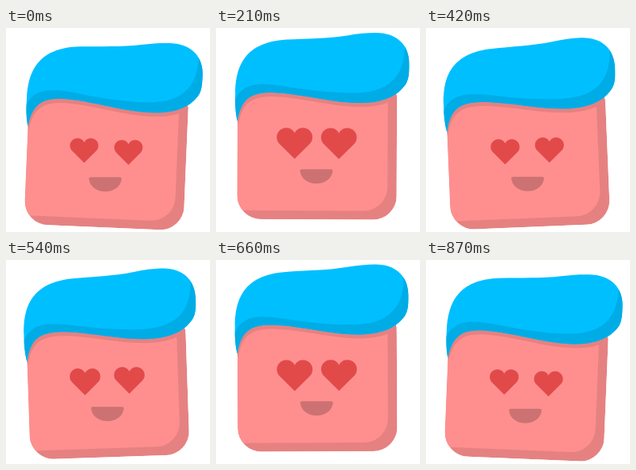
These frames come from a looping animation (256 by 256 pixels, 0.9 s). An HTML page:

```html
<!DOCTYPE html>
<html lang="en">
<head>
<meta charset="utf-8">
<title>Love-struck cube</title>
<style>
  html, body { margin: 0; width: 100%; height: 100%; overflow: hidden; background: #fff; }
  svg { display: block; width: 100%; height: 100%; }
</style>
</head>
<body>
<svg viewBox="0 0 256 256">
  <defs>
    <path id="hairShape" d="M26.800 117C24.500 108 23.500 95 24 82C24.500 50 34 18 88 14.500C112 13 140 13 164 9C178 6.500 190 5.500 200 5.500C227 5.500 242 21 242 45C242 60 241 68 233 75.500C220 90 197 94 177 93.500C150 93 125 87 102 84C88 82 77 81 66 81C40 81.500 31 93 26.800 117Z"/>
    <path id="heart" fill="#e24a4a" d="M0 19.8L-19 .8A11.9 11.9 0 1 1 0 -13A11.9 11.9 0 1 1 19 .8Z"/>
    <clipPath id="bodyClip"><rect x="27" y="60" width="200" height="180" rx="30"/></clipPath>
    <clipPath id="hairClip"><use href="#hairShape"/></clipPath>
  </defs>
  <g id="head">
    <g clip-path="url(#bodyClip)">
      <rect x="27" y="60" width="200" height="180" fill="#e68181"/>
      <rect x="-13" y="40" width="228.500" height="189" rx="30" fill="#ff8f8f"/>
      <g class="hair"><use href="#hairShape" x="1" y="5" fill="#e68181"/></g>
    </g>
    <use class="eye" href="#heart"/>
    <use class="eye" href="#heart"/>
    <g class="hair">
      <use href="#hairShape" fill="#00bfff"/>
      <path clip-path="url(#hairClip)" fill="#00ace6" d="M10 130L24 90C34 68 55 68 92 74C120 78.500 145 81 170 81C205 81 238 70 236 18H256V130Z"/>
    </g>
  </g>
  <path id="mouth" fill="#cc7272" d="M108 177H145Q147 177 147 179C146 189 137 195 126.500 195C116 195 107 189 106 179Q106 177 108 177Z"/>
</svg>
<script>
  const LOOP = 900, STEP = 30;
  const head = document.getElementById('head');
  const mouth = document.getElementById('mouth');
  const hair = document.querySelectorAll('.hair');
  const eyes = document.querySelectorAll('.eye');
  const eyeX = [98.7, 154.3];

  const place = (el, transform) => el.setAttribute('transform', transform);

  function draw(t) {
    const turn = 2 * Math.PI / LOOP;
    const sway = Math.cos(turn * t);
    // two hops per sway
    const lift = (1 - Math.cos(2 * turn * (t - 8))) / 2;
    const drop = 10.4 * (1 - lift);
    const tilt = 2.4 * sway;
    const beat = 0.79 + 0.21 * lift;

    place(head, `translate(0 ${drop}) rotate(${tilt} 127 130)`);
    hair.forEach(h => place(h, `translate(27 0) scale(${1 + 0.006 * sway} 1) translate(-27 0)`));
    // eyes and mouth stay level while the head tilts
    eyes.forEach((e, i) => place(e, `translate(${eyeX[i]} 144.5) rotate(${-tilt}) scale(${beat})`));
    place(mouth, `translate(${-0.4 - 1.5 * sway} ${drop})`);
  }

  const start = performance.now();
  function tick() {
    const t = (performance.now() - start) % LOOP;
    draw(Math.floor(t / STEP) * STEP);
    requestAnimationFrame(tick);
  }
  tick();
</script>
</body>
</html>
```
